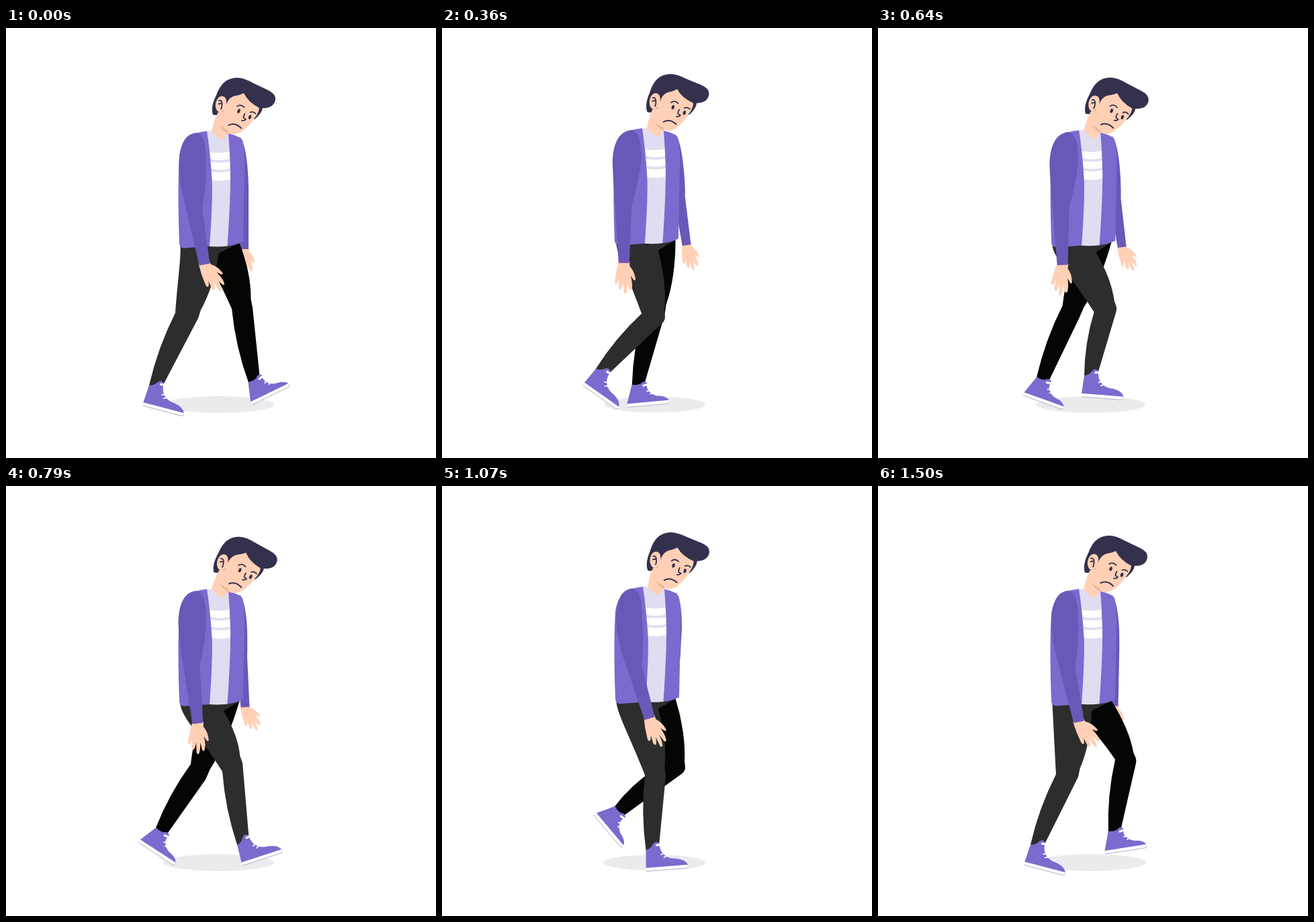
These frames come from a looping animation (640 by 640 pixels, 1.57 s). An HTML page with a canvas:

```html
<!DOCTYPE html>
<html lang="en">
<head>
<meta charset="utf-8">
<title>Sad walk</title>
<style>
  html, body { margin: 0; width: 100%; height: 100%; overflow: hidden; background: #fff; }
  canvas { display: block; }
</style>
</head>
<body>
<canvas id="stage" width="640" height="640"></canvas>
<script>
const ctx = document.getElementById('stage').getContext('2d');
const LOOP = 1570, STEPS = 22;
const COLOR = {
  jacket: '#7c6acf', sleeve: '#6958b7', shirt: '#e0dcf2', skin: '#ffd0b5', neckShade: '#e9b99b',
  hair: '#33314c', near: '#2d2d2d', far: '#040603', shadow: '#ebebed', sole: '#9a92c4'
};

// Steps at which the poses below are given; values between are interpolated.
const KEYS = [0, 3, 7, 11, 15, 18, 21];

// shoe: heel x, heel y, pitch in degrees; kneeBack and kneeFront: x, y
const nearLeg = {
  color: COLOR.near, ankleBack: [2, -31], ankleFront: [22, -37],
  shoe: [[203, 562, 14.7], [192, 537, 33], [241, 534, 29], [352, 565, -18], [304, 573.5, -4.5], [258, 571.5, 6.5], [217, 564, 14.7]],
  kneeBack: [[252, 424], [277, 428], [314, 422], [322, 425], [302, 430], [286, 431], [265, 429]],
  kneeFront: [[286, 432], [309, 440], [352, 427], [352, 412], [333, 432], [318, 432], [298, 433]]
};
const farLeg = {
  color: COLOR.far, ankleBack: [10, -32], ankleFront: [29, -33],
  shoe: [[366, 561, -26], [308.5, 566, -15], [246, 559, 6], [197, 530.5, 33], [226, 490, 50], [275, 506.5, 32], [338, 548, -9]],
  kneeBack: [[336, 418], [319, 422], [284, 414], [275, 414], [315, 423], [355, 402], [353, 407]],
  kneeFront: [[367, 416], [349, 428], [315, 424], [297, 437], [363, 424], [390, 402], [385, 408]]
};
const nearWrist = [[295.5, -20], [280.5, 0], [268, 16], [285.5, 12], [309, -11], [305, -21], [299, -23]];
// elbow x, wrist x, wrist y, hand angle
const farArm = [[361, 354.5, 329, 6], [362, 361, 329, 3], [363, 367, 326, -10], [359, 356, 329, -15],
  [355, 338, 327, 0], [355, 338, 327, 0], [359, 351, 328, 8]];
const headTilt = [[0], [-.07], [-.01], [.055], [-.06], [.01], [0]];
const sway = [[0], [-2], [0], [0], [0], [0], [0]];

const shape = d => new Path2D(d);
const hand = shape('M-8-4L8-4L9 3Q18 10 21 21Q21 24 18 22L13 17Q19 30 18 37Q16 40 14 36L9.5 27Q12 38 11 44Q8 46 7 42L3.5 28Q4 36 2 40Q-1 41-2 37L-3 25Q-4 31-6 33Q-9 33-9 27Q-10 12-8-4Z');
const sole = shape('M0-5L63-5Q64-1 62 0L1 0Q-1-1 0-5Z');
nearLeg.upper = shape('M0-4.5L2-32Q9-33 12-38Q17-46 22.5-40Q22-28 30-21Q36-16 46-15.5Q60-13 63-4.5Z');
nearLeg.tie = shape('M18.5-37.5L22.5-38');
nearLeg.laces = shape('M24-23L29.5-25M28-18.5L33.5-21');
farLeg.upper = shape('M0-4.5L10-33Q17-31 23-33Q29-39 33-33Q30-25 36-19Q42-13 50-12.5Q60-11 63-4.5Z');
farLeg.tie = shape('M27-30L32-31');
farLeg.laces = shape('M31.5-21L37-23M36-16.5L41-19');

const torso = {
  shirt: shape('M297 153L332 156L336 230L330 324.5Q316 326 302 325L304 230Z'),
  stripes: shape('M300 184Q318 188 335 183.5L336 225Q318 229 303 226Z'),
  gaps: shape('M300 196Q319 201 336 196M302 210.5Q319 215.5 336 210.5'),
  left: shape('M299 153.5Q290 154 281 157Q262 163 258 190Q255 240 258 321Q259 328 266 327.5L303 325Q308 255 306.5 225Q304 185 299 153.5Z'),
  right: shape('M331 157Q346 160 352 167Q356 182 355 215L353 318Q342 323 329.5 324.5Q334.5 250 334 215Q333 180 331 157Z')
};
const head = {
  neck: shape('M312 132L306 153Q312 161 321 166.5Q326 163 330.5 157L331 146Z'),
  neckShade: shape('M318 145Q324 155 331 157.5L331 153Z'),
  hair: shape('M308 129Q304 118 313 100Q322 74 344 74Q354 74 368 82L390 92.5Q402 98 401 107Q398 120 382 119Q381 127 370 136L340 130L316 129Q312 130 308 129Z'),
  face: shape('M329 111Q333 103 340 101Q348 100 354 97Q360 110 377 119Q376 127 370 134Q362 146 351 154Q342 160 333 157Q323 150 311 139Q313 130 316 125L323 124Z'),
  ear: shape('M328 112C329 103 323 99 317 103C311 108 310 119 315 124C321 128 327 121 328 112Z'),
  lines: shape('M317 108Q322 107 321.500 114Q321.500 118 320 120.500M316.500 113Q318 111.500 321.500 113M344 116.500Q349 112.500 354.500 118M363.500 125.500Q368 123.500 371.500 127.500M355.500 127.500Q353 132 353.500 133.500L357 136Q354 138.500 351 137.500'),
  mouth: shape('M331.500 144.500Q341 140 350 149')
};

// Periodic smooth interpolation through the key poses.
function sample(poses, k) {
  const n = KEYS.length;
  const time = i => KEYS[(i + n) % n] + STEPS * Math.floor(i / n);
  const pose = i => poses[(i + n) % n];
  let i = n - 1;
  while (KEYS[i] > k) i--;
  const span = time(i + 1) - time(i), u = (k - time(i)) / span;
  return pose(i).map((a, c) => {
    const b = pose(i + 1)[c];
    const slope = j => (pose(j + 1)[c] - pose(j - 1)[c]) / (time(j + 1) - time(j - 1)) * span;
    return a + u * u * (3 - 2 * u) * (b - a) + u * (1 - u) * ((1 - u) * slope(i) - u * slope(i + 1));
  });
}

const rad = deg => deg * Math.PI / 180;
const mix = (a, b, u) => [a[0] + (b[0] - a[0]) * u, a[1] + (b[1] - a[1]) * u];

// Midpoint of a and b pushed sideways by the given amount.
function bulge(a, b, amount) {
  const dx = b[0] - a[0], dy = b[1] - a[1], len = Math.hypot(dx, dy), m = mix(a, b, .5);
  return [m[0] + dy / len * amount, m[1] - dx / len * amount];
}

function fill(path, color) {
  ctx.fillStyle = color;
  ctx.fill(path);
}

function stroke(path, color, width) {
  ctx.strokeStyle = color;
  ctx.lineWidth = width;
  ctx.stroke(path);
}

function placed(x, y, angle, draw) {
  ctx.save();
  ctx.translate(x, y);
  ctx.rotate(angle);
  draw();
  ctx.restore();
}

function drawShoe(leg, x, y, angle) {
  placed(x, y, angle, () => {
    fill(leg.upper, COLOR.jacket);
    fill(sole, '#fff');
    stroke(shape('M0-1Q0 0 2 0L61 0Q63-1 63-3'), COLOR.sole, .7);
    ctx.lineCap = 'round';
    stroke(leg.tie, '#fff', 3.2);
    stroke(leg.laces, '#fff', 1.7);
  });
}

function drawLeg(leg, k, bob) {
  const [x, y, pitch] = sample(leg.shoe, k);
  const kneeBack = sample(leg.kneeBack, k), kneeFront = sample(leg.kneeFront, k);
  const angle = rad(pitch), c = Math.cos(angle), s = Math.sin(angle);
  const toStage = ([px, py]) => [x + px * c - py * s, y + px * s + py * c];
  const ankleBack = toStage(leg.ankleBack), ankleFront = toStage(leg.ankleFront);
  const isNear = leg === nearLeg;
  const hipBack = isNear ? [259.5, 325 + bob] : [285 + .25 * (kneeBack[0] - 275), 335 + bob];
  const hipFront = [347.5, 320 + bob];
  const thighTop = isNear ? [317 + .105 * (kneeFront[0] - 288), 335 + bob] : hipFront;
  const nearKnee = mix(thighTop, kneeFront, .87);

  const p = new Path2D();
  p.moveTo(...hipBack);
  p.bezierCurveTo(hipBack[0] + 1, hipBack[1] + 17, ...mix(hipBack, kneeBack, .5), ...kneeBack);
  p.quadraticCurveTo(...bulge(kneeBack, ankleBack, -7), ...ankleBack);
  p.lineTo(...toStage([leg.ankleBack[0] + 9, -30]));
  p.lineTo(...ankleFront);
  p.arcTo(...kneeFront, ...nearKnee, 13);
  p.lineTo(...nearKnee);
  p.quadraticCurveTo(...bulge(thighTop, kneeFront, 8), ...thighTop);
  p.lineTo(...hipFront);
  p.lineTo(hipFront[0] - 6, 312 + bob);
  p.lineTo(hipBack[0], 315 + bob);
  p.closePath();
  fill(p, leg.color);
  drawShoe(leg, x, y, angle);
}

function drawHand(x, y, deg, size) {
  placed(x, y, rad(deg), () => {
    ctx.scale(size, size);
    fill(hand, COLOR.skin);
  });
}

// Left and right end of the cuff, square to the forearm.
function cuff(elbow, wrist, half) {
  const a = Math.atan2(wrist[0] - elbow[0], wrist[1] - elbow[1]);
  const dx = Math.cos(a) * half, dy = -Math.sin(a) * half;
  return [[wrist[0] - dx, wrist[1] - dy], [wrist[0] + dx, wrist[1] + dy]];
}

function drawFarArm(k) {
  const [elbow, x, y, deg] = sample(farArm, k);
  drawHand(x, y, deg, .84);
  const [left, right] = cuff([elbow - 8, 254], [x, y], 6.5);
  const p = new Path2D('M348 162');
  p.quadraticCurveTo(357, 172, 360 + (elbow - 361) * .5, 215);
  p.quadraticCurveTo(elbow + .5, 238, elbow, 255);
  p.lineTo(...right);
  p.lineTo(...left);
  p.lineTo(elbow - 17, 254);
  p.lineTo(338, 180);
  fill(p, COLOR.sleeve);
}

function drawNearArm(k) {
  const [x, deg] = sample(nearWrist, k);
  const y = 354 - .0027 * (x - 268) ** 2;
  const elbow = 257 + .365 * (x - 268);
  const side = 257.5 + (elbow - 267) * .3;
  drawHand(x, y, deg, 1);
  const [left, right] = cuff([elbow + 12.5, 267], [x, y], 8);
  const p = new Path2D('M284 156');
  p.bezierCurveTo(268, 157, side + 1, 170, side, 204);
  p.quadraticCurveTo(side + 1, 232, elbow, 265);
  p.lineTo(...left);
  p.lineTo(...right);
  p.lineTo(elbow + 25, 269);
  p.quadraticCurveTo((elbow + 325) / 2 + 3, 230, 298, 198);
  p.quadraticCurveTo(298, 160, 284, 156);
  fill(p, COLOR.sleeve);
}

function drawTorso() {
  fill(torso.shirt, COLOR.shirt);
  fill(torso.stripes, '#fff');
  stroke(torso.gaps, COLOR.shirt, 3.6);
  fill(torso.left, COLOR.jacket);
  fill(torso.right, COLOR.jacket);
}

function drawHead(tilt) {
  placed(318, 155, tilt, () => {
    ctx.translate(-318, -155);
    fill(head.neck, COLOR.skin);
    fill(head.hair, COLOR.hair);
    fill(head.face, COLOR.skin);
    fill(head.neckShade, COLOR.neckShade);
    fill(head.ear, COLOR.skin);
    ctx.lineCap = ctx.lineJoin = 'round';
    stroke(head.lines, COLOR.hair, 1.8);
    stroke(head.mouth, COLOR.hair, 2);
    for (const [x, y] of [[346.5, 123.5], [363, 132.5]]) {
      const eye = new Path2D();
      eye.ellipse(x, y, 2.1, 3.3, .35, 0, 2 * Math.PI);
      fill(eye, COLOR.hair);
    }
  });
}

function drawShadow(k) {
  const wave = Math.cos(4 * Math.PI * (k + .3) / STEPS);
  const p = new Path2D();
  p.ellipse(316.5, 560.5, 79 + 3.8 * wave, 12 + .5 * wave, 0, 0, 2 * Math.PI);
  fill(p, COLOR.shadow);
}

function render(k) {
  const bob = -2.1 + 2.2 * Math.cos(4 * Math.PI * k / STEPS);
  const [shift] = sample(sway, k);
  const upper = draw => placed(shift, bob, 0, draw);
  ctx.fillStyle = '#fff';
  ctx.fillRect(0, 0, 640, 640);
  drawShadow(k);
  upper(() => drawFarArm(k));
  drawLeg(farLeg, k, bob);
  drawLeg(nearLeg, k, bob);
  upper(() => {
    drawTorso();
    drawNearArm(k);
    drawHead(sample(headTilt, k)[0]);
  });
}

// The walk advances in 22 held steps per loop, timed in whole centiseconds.
function tick() {
  const t = performance.now() % LOOP;
  render(Math.floor((t + 5) / (LOOP / STEPS)) % STEPS);
  requestAnimationFrame(tick);
}
tick();
</script>
</body>
</html>
```
